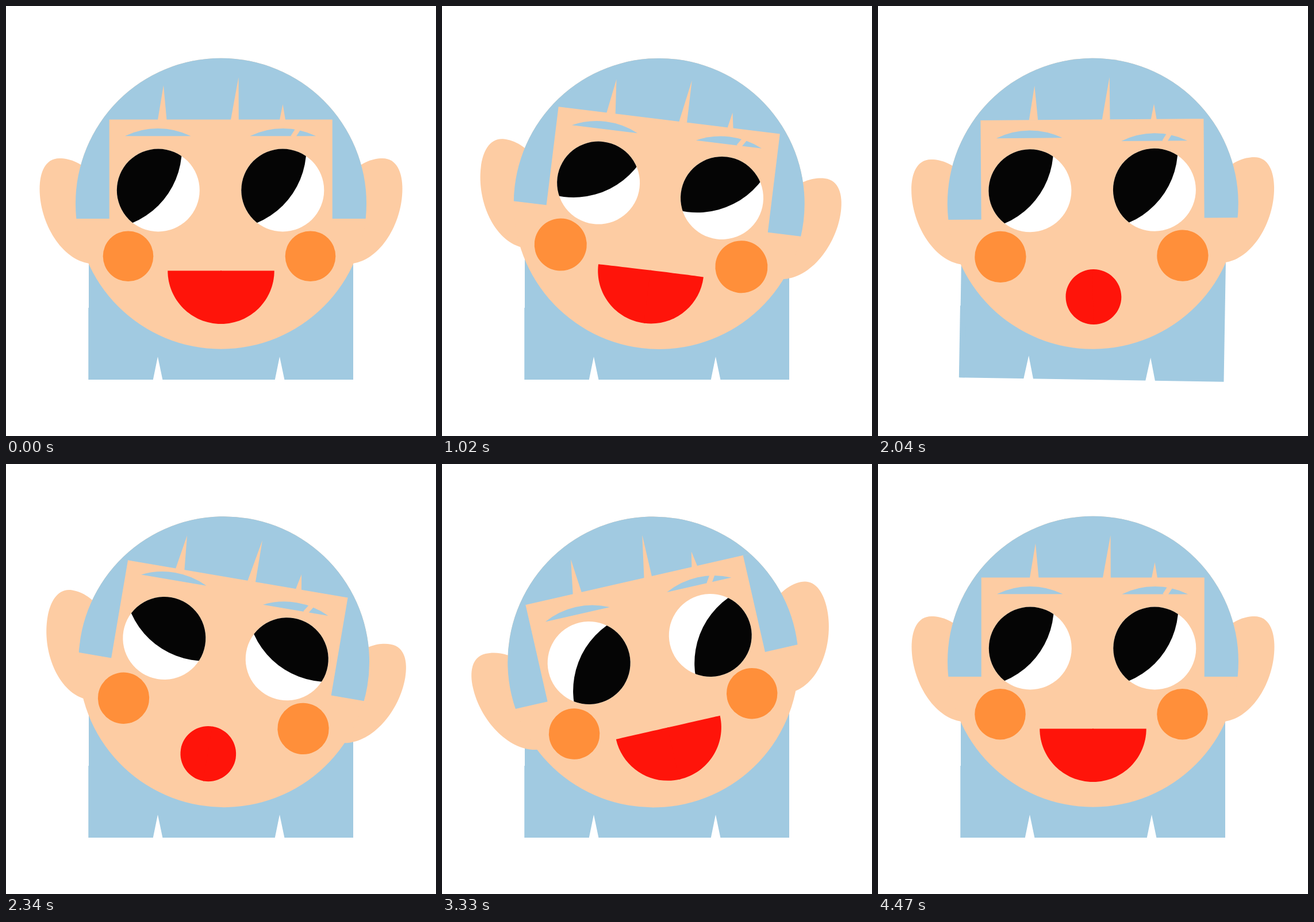
An HTML page with a canvas for the animation above (4.5 s loop, 748x748 px).

```html
<!DOCTYPE html>
<html lang="en">
<head>
<meta charset="utf-8">
<title>Looking around</title>
<style>
  html, body { margin: 0; width: 100%; height: 100%; overflow: hidden; background: #fff; }
  canvas { display: block; width: 100vw; height: 100vh; }
</style>
</head>
<body>
<canvas id="stage" width="748" height="748"></canvas>
<script>
const ctx = document.getElementById('stage').getContext('2d');
const LOOP = 4500, SIZE = 748, MID = SIZE / 2, BASE = 650;
const HAIR = '#a1cae1', SKIN = '#fdcca3', CHEEK = '#ff8f3a', RED = '#ff140a', BLACK = '#050505', WHITE = '#fff';

// The head turns that also drive the sway of the body.
const turns = [
  { start: 0, end: 520, by: 7 },
  { start: 1080, end: 1420, by: -15 },
  { start: 1800, end: 2330, by: 17.66 },
  { start: 2360, end: 2700, by: -22.48 },
  { start: 3330, end: 3780, by: 12.82 },
];

const rad = deg => deg * Math.PI / 180;
const lerp = (a, b, p) => a + (b - a) * p;
const linear = (t, start, end) => Math.min(1, Math.max(0, (t - start) / (end - start)));
const sum = (list, f) => list.reduce((total, item) => total + f(item), 0);

function ramp(t, start, end) {
  const p = linear(t, start, end);
  return p * p * (3 - 2 * p);
}

// Everything that changes, as a function of time.
function poseAt(t) {
  const raise = 20 * ramp(t, 1000, 1300);
  return {
    head: sum(turns, m => m.by * ramp(t, m.start, m.end)),
    // The body swings out and back just before each turn ends.
    body: sum(turns, m => 0.165 * m.by * Math.sin(Math.PI * linear(t, m.end - 360, m.end)) ** 2),
    gaze: 26.5 * (ramp(t, 0, 520) - ramp(t, 1000, 1300))
      + 180 * (ramp(t, 2110, 2610) - ramp(t, 3330, 3780)),
    leftBrow: raise - 28 * ramp(t, 1640, 2330) + 15.5 * ramp(t, 2360, 2800) - 7.5 * linear(t, 3330, 4470),
    rightBrow: raise - 11 * ramp(t, 1640, 2060) - 9 * linear(t, 2060, LOOP),
    round: ramp(t, 1000, 1300) - ramp(t, 2360, 2700),
    blush: 1 - Math.abs(1 - (t % 300) / 150),
  };
}

function turned(deg, x, y, draw) {
  ctx.save();
  ctx.translate(x, y);
  ctx.rotate(rad(deg));
  ctx.translate(-x, -y);
  draw();
  ctx.restore();
}

function mirrored(draw) {
  draw();
  ctx.save();
  ctx.translate(SIZE, 0);
  ctx.scale(-1, 1);
  draw();
  ctx.restore();
}

function spike(color, left, right, base, tipX, tipY) {
  ctx.fillStyle = color;
  ctx.beginPath();
  ctx.moveTo(left, base);
  ctx.lineTo(tipX, tipY);
  ctx.lineTo(right, base);
  ctx.fill();
}

function disc(color, x, y, r) {
  ctx.fillStyle = color;
  ctx.beginPath();
  ctx.arc(x, y, r, 0, 2 * Math.PI);
  ctx.fill();
}

function body() {
  ctx.fillStyle = HAIR;
  ctx.fillRect(144, 355, 460, BASE - 355);
  ctx.fillRect(143.3, 525, 10, BASE - 525);
  for (const x of [264, 476]) spike(WHITE, x - 8.4, x + 8.6, BASE + 1, x, 610);
}

function ear() {
  ctx.fillStyle = SKIN;
  ctx.beginPath();
  ctx.moveTo(155, 298);
  ctx.bezierCurveTo(133, 272, 110, 265, 93, 265);
  ctx.bezierCurveTo(68, 265, 58.5, 290, 58.5, 318);
  ctx.bezierCurveTo(58.5, 378, 97, 442, 146, 448);
  ctx.lineTo(200, 440);
  ctx.fill();
}

function skull() {
  const y = 343.7, r = 253, fringe = 197.5;
  mirrored(ear);
  disc(SKIN, MID, y, r);
  ctx.save();
  ctx.beginPath();
  ctx.rect(100, 80, 548, fringe - 80);
  ctx.rect(100, fringe, 79.7, 370 - fringe);
  ctx.rect(567.7, fringe, 80, 370 - fringe);
  ctx.clip();
  disc(HAIR, MID, y, r);
  ctx.restore();
  spike(SKIN, 264, 279.5, fringe + 0.5, 274, 138);
  spike(SKIN, 391, 404.8, fringe + 0.5, 404.5, 124);
  spike(SKIN, 476, 486, fringe + 0.5, 481.5, 171);
}

function brow(x, drop) {
  const half = 57.5, rise = 13.3, y = 226.3 + drop;
  const r = (half * half + rise * rise) / (2 * rise), a = Math.asin(half / r);
  ctx.fillStyle = HAIR;
  ctx.beginPath();
  ctx.arc(x, y + r - rise, r, -Math.PI / 2 - a, -Math.PI / 2 + a);
  ctx.fill();
}

function browScar(drop) {
  ctx.strokeStyle = SKIN;
  ctx.lineWidth = 8.5;
  ctx.beginPath();
  ctx.moveTo(499, 228 + drop);
  ctx.lineTo(510, 211 + drop);
  ctx.stroke();
}

function eye(x, gaze) {
  const y = 320.5, r = 72, a = rad(36.2 + gaze);
  disc(WHITE, x, y, r);
  ctx.save();
  ctx.beginPath();
  ctx.arc(x, y, r, 0, 2 * Math.PI);
  ctx.clip();
  disc(BLACK, x - 122.5 * Math.cos(a), y - 122.5 * Math.sin(a), 140);
  ctx.restore();
}

// A half disc that rounds off into a full one.
function mouth(round) {
  const k = 0.5523, w = lerp(92.7, 48.4, round), side = lerp(460.5, 506, round);
  const top = lerp(460.5, 458, round), bottom = lerp(553, 554, round);
  const up = side - k * (side - top), down = side + k * (bottom - side);
  ctx.fillStyle = RED;
  mirrored(() => {
    ctx.beginPath();
    ctx.moveTo(MID + 1, top);
    ctx.lineTo(MID, top);
    ctx.bezierCurveTo(MID - k * w, top, MID - w, up, MID - w, side);
    ctx.bezierCurveTo(MID - w, down, MID - k * w, bottom, MID, bottom);
    ctx.lineTo(MID + 1, bottom);
    ctx.fill();
  });
}

function head(pose) {
  skull();
  brow(264.2, pose.leftBrow);
  brow(481.8, pose.rightBrow);
  browScar(pose.rightBrow);
  eye(264.8, pose.gaze);
  eye(481.3, pose.gaze);
  const r = 43.8 * (1 + 0.05 * pose.blush);
  disc(CHEEK, 212.5, 435.2, r);
  disc(CHEEK, 529.5, 435.2, r);
  mouth(pose.round);
}

let begin;
function frame(now) {
  begin ??= now;
  const pose = poseAt((now - begin) % LOOP);
  ctx.fillStyle = WHITE;
  ctx.fillRect(0, 0, SIZE, SIZE);
  turned(pose.body, MID, 502, body);
  turned(pose.head, MID, MID, () => head(pose));
  requestAnimationFrame(frame);
}
requestAnimationFrame(frame);
</script>
</body>
</html>
```
